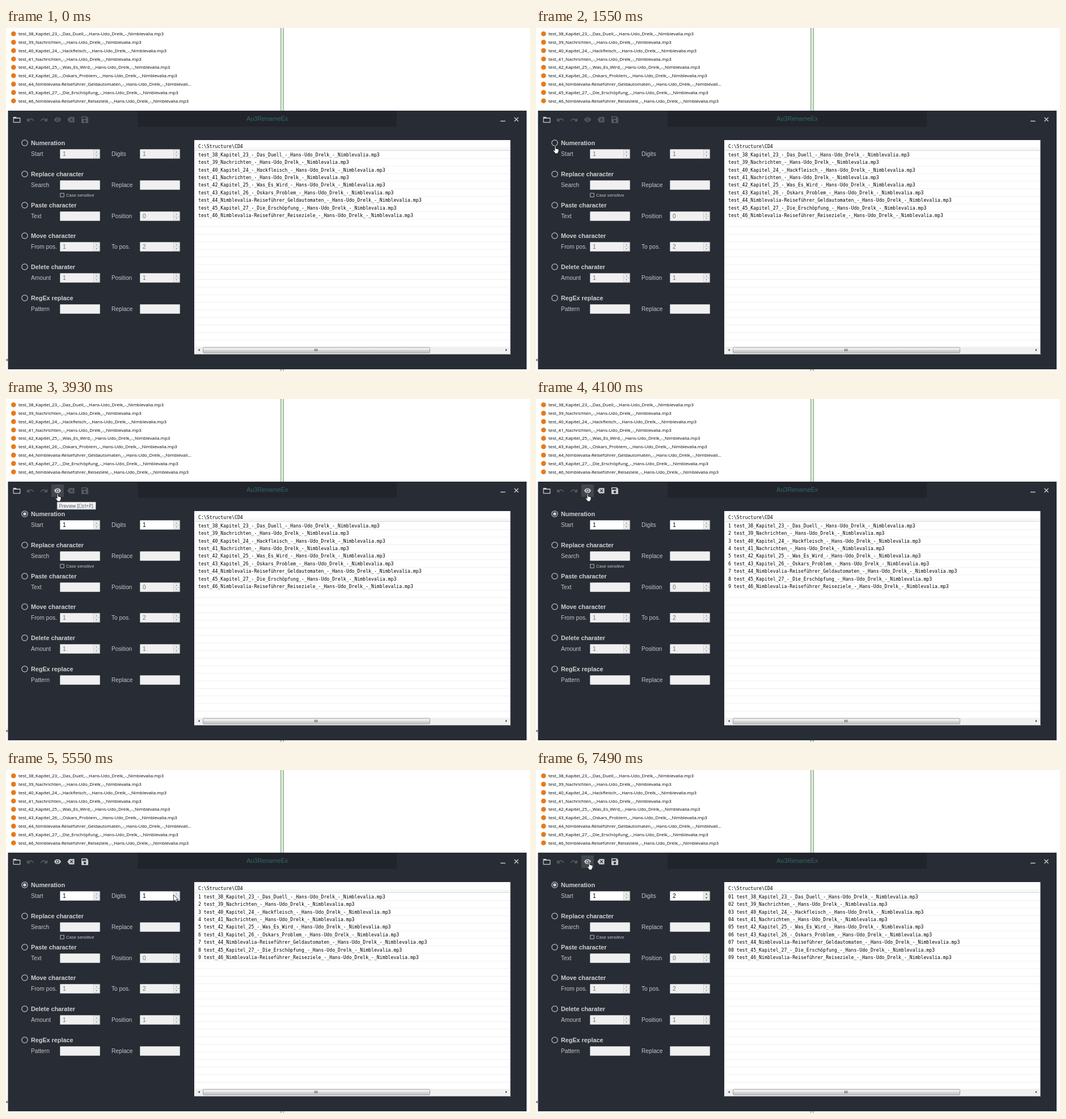
An HTML page for the animation above (8 s loop, 924 by 606 pixels).

```html
<!DOCTYPE html>
<html lang="en">
<head>
<meta charset="utf-8">
<title>Batch rename</title>
<style>
  html, body { margin: 0; width: 100%; height: 100%; overflow: hidden; background: #fff; }
  svg { display: block; width: 100vw; height: 100vh; }
  text { font: 10.2px "Liberation Sans", sans-serif; white-space: pre; }
  .file, .hint { font: 7.95px "Open Sans", sans-serif; fill: #000; }
  .hint { font-size: 8.2px; fill: #555; }
  .mono { font: 8.18px "DejaVu Sans Mono", monospace; fill: #000; }
  .title { font-size: 10.9px; fill: #2f6967; }
  .head { font-weight: bold; font-size: 10.8px; fill: #d0d0d0; }
  .label { fill: #c4c5c7; }
  .small { font-size: 7.6px; fill: #c4c5c7; }
  .field { fill: #f0f0f0; stroke: #b9bbbf; }
  .value { fill: #75756c; }
  .on .field { fill: #fff; }
  .on .value { fill: #000; }
  .on .field.focus { stroke: #6fa8dc; }
  .on .value.focus { fill: #fff; }
  .dot { fill: #d0d0d0; visibility: hidden; }
  .on .dot { visibility: visible; }
  .icon { color: #575b61; }
  .icon.lit { color: #cbcccd; }
</style>
</head>
<body>
<svg id="stage" viewBox="0 0 924 606"></svg>
<script>
const LOOP = 8000;
const AUTHOR = 'Hans-Udo_Drelk', BOOK = 'Nimblevalia';
const files = [
  'Kapitel_23_-_Das_Duell', 'Nachrichten', 'Kapitel_24_-_Hackfleisch', 'Nachrichten',
  'Kapitel_25_-_Was_Es_Wird', 'Kapitel_26_-_Oskars_Problem', BOOK + '-Reiseführer_Geldautomaten',
  'Kapitel_27_-_Die_Erschöpfung', BOOK + '-Reiseführer_Reiseziele'
].map((name, i) => `test_${38 + i}_${name}_-_${AUTHOR}_-_${BOOK}.mp3`);

// Heading, then label and value of both fields; numeric values get a spinner.
const sections = [
  ['Numeration', 'Start', 1, 'Digits', 1],
  ['Replace character', 'Search', '', 'Replace', ''],
  ['Paste character', 'Text', '', 'Position', 0],
  ['Move character', 'From pos.', 1, 'To pos.', 2],
  ['Delete charater', 'Amount', 1, 'Position', 1],
  ['RegEx replace', 'Pattern', '', 'Replace', '']
];

const text = (x, y, cls, str, id = '') => `<text x="${x}" y="${y}" class="${cls}" id="${id}">${str}</text>`;
const rect = (x, y, w, h, attrs) => `<rect x="${x}" y="${y}" width="${w}" height="${h}" ${attrs}/>`;
const path = (d, attrs = 'fill="currentColor"') => `<path d="${d}" ${attrs}/>`;
const repeat = (n, fn) => Array.from({ length: n }, (_, i) => fn(i)).join('');

const icon = (id, x, art, lit = '') =>
  `<g id="${id}" class="icon ${lit}" transform="translate(${x} 162)">${art}</g>`;

const spinner = (x, y, id) => `<g id="${id}" color="#999">` + rect(x, y, 11, 15, 'fill="#f0f0f0"') +
  [.5, 7.5].map(dy => rect(x + .5, y + dy, 10, 7, 'fill="#f1f1f1" stroke="#c6c6c6" stroke-width=".8"')).join('') +
  path(`M${x + 3.6} ${y + 5}h3.8l-1.9-2.2z`) + path(`M${x + 3.6} ${y + 10}h3.8l-1.9 2.2z`) + '</g>';

const field = (x, y, value, id) =>
  rect(x + .5, y + .5, 70, 16, `id="${id}Box" class="field" rx=".6"`) +
  (value === '' ? '' : spinner(x + 59, y + 1, id + 'Spin') +
    rect(x + 5, y + 2, 6, 13, `id="${id}Mark" fill="#3399ff" visibility="hidden"`) +
    text(x + 5, y + 12, 'value', value, id));

function section([title, labelA, valueA, labelB, valueB], i) {
  const y = Math.round(203 + 54.8 * i);
  return `<g id="section${i}">
    <circle cx="33" cy="${y}" r="5.2" fill="none" stroke="#c2c3c5" stroke-width="1.2"/>
    <circle cx="33" cy="${y}" r="2.8" class="dot"/>` +
    text(44, y + 4, 'head', title) +
    text(44, y + 23, 'label', labelA) + text(186, y + 23, 'label', labelB) +
    field(95, y + 11, valueA, 'a' + i) + field(236, y + 11, valueB, 'b' + i) + '</g>';
}

const undoPath = 'M-6-3v6h6l-2.3-2.3c1-.8 2-1.2 3-1.2 2.2 0 3.7 1.2 4.3 3l1.4-.6c-.8-2.5-3-4.2-5.7-4.2-1.6 0-3 .6-4.1 1.6z';
const eyePath = 'M-6 0c1.2-2.8 3.4-4.2 6-4.2s4.8 1.4 6 4.2c-1.2 2.8-3.4 4.2-6 4.2s-4.8-1.4-6-4.2zM0-2.8a2.8 2.8 0 1 0 .01 0z';

const explorer = rect(484, 0, 6, 606, 'fill="#d3efcf"') +
  path('M484.5 0V606M489.5 0V606', 'stroke="#8b958a"') +
  path('M0 604.5H484M490 604.5H924', 'stroke="#eee"') + path('M2.5 584v5l-2.5-2.5z', 'fill="#444"') +
  files.map((name, i) => {
    const y = 10 + 14.8 * i;
    return `<circle cx="13.3" cy="${y + .3}" r="4.3" fill="#e67a1c"/>` +
      text(22, y + 3.1, 'file', i === 6 ? name.slice(0, -5) + '...' : name);
  }).join('');

const toolbar = rect(80, 151, 22, 22, 'id="hover" fill="#42464d"') +
  icon('open', 19, path('M-5.8 4.6v-9h4l1.5 1.6h6.1v7.4z', 'fill="none" stroke="currentColor" stroke-width="1.2"') +
    path('M-5.8-4.6h4l1.5 1.7h6v1h-11.5z'), 'lit') +
  icon('undo', 43, path(undoPath)) +
  icon('redo', 67, `<g transform="scale(-1 1)">${path(undoPath)}</g>`) +
  icon('eye', 91, path(eyePath, 'fill="currentColor" fill-rule="evenodd"') + '<circle r="1.7" fill="currentColor"/>') +
  icon('clear', 114.5, path('M-6.3 0l3.5-4.8h8.8v9.6h-8.8z') + path('M-1.3-2.4l4.6 4.8m0-4.8l-4.6 4.8', 'stroke="#282c34" stroke-width="1.3"')) +
  icon('save', 139, path('M-6-5q0-1 1-1h8.2l2.8 2.8v8.2q0 1-1 1h-10q-1 0-1-1zM-4.5-4.6v3h6.8v-3zM0 .3a2.1 2.1 0 1 0 .01 0z', 'fill="currentColor" fill-rule="evenodd"'));

const list = rect(332, 198, 558, 379, 'fill="#fff"') +
  path('M889.5 198V576.5H332', 'fill="none" stroke="#85878b"') +
  rect(333, 211, 556, 5, 'fill="#f6f7f8"') + path('M333 216.3H889', 'stroke="#d5d5d5"') +
  text(339, 211.7, 'mono', 'C:\\Structure\\CD4') +
  repeat(25, i => path(`M333 ${(230.6 + 13.37 * i).toFixed(1)}H889`, 'stroke="#eee" stroke-width=".9"')) +
  files.map((_, i) => text(339, 227 + 13.37 * i, 'mono', '', 'row' + i)).join('') +
  rect(333, 563.3, 556, 12.7, 'fill="#f0f0f0"') +
  rect(347.5, 564.2, 400, 9.8, 'rx="1.5" fill="url(#thumb)" stroke="#979797" stroke-width=".9"') +
  path('M544.5 566.7v4.4m2.2-4.4v4.4m2.2-4.4v4.4', 'stroke="#555" stroke-width="1"') +
  path('M341.5 566.7v4.4l-2.6-2.2zM881 566.7v4.4l2.6-2.2z', 'fill="#333"');

stage.innerHTML = `<defs>
    <linearGradient id="thumb" x2="0" y2="1"><stop stop-color="#f4f4f4"/><stop offset=".5" stop-color="#e6e6e7"/><stop offset=".52" stop-color="#d4d4d6"/><stop offset="1" stop-color="#c5c5c8"/></linearGradient>
    <linearGradient id="tip" x2="0" y2="1"><stop stop-color="#fff"/><stop offset="1" stop-color="#e4e5f0"/></linearGradient>
  </defs>` + explorer +
  rect(3.5, 146, 914.5, 457, 'fill="#282c34"') + rect(232, 147, 457, 27.5, 'fill="#21242b"') +
  text(424, 164, 'title', 'Au3RenameEx') + toolbar +
  path('M872 164.5h8.5M896.5 158l7 7m0-7l-7 7', 'stroke="#c6c7c9" stroke-width="1.5"') +
  sections.map(section).join('') +
  rect(95.8, 292, 6.4, 6.4, 'fill="none" stroke="#c4c5c7" stroke-width=".9"') + text(106, 298, 'small', 'Case sensitive') +
  rect(247, 216, 1, 12, 'id="caret"') + list +
  `<g id="tooltip">${rect(1.5, 1.5, 69, 13.5, 'fill="#000" opacity=".3"')}
    ${rect(.5, .5, 68.5, 13.2, 'fill="url(#tip)" stroke="#767676" stroke-width=".8"')}${text(4, 10.2, 'hint', 'Preview [Ctrl+P]')}</g>
  <g id="cursor" fill="#fff" stroke="#000" stroke-width=".8" stroke-linejoin="round">
    <path id="arrow" d="M.4.5v11.6l2.7-2.5 1.8 4.1 1.9-.9-1.8-3.9h3.7z"/>
    <path id="hand" d="M-1 .9q0-.9 1-.9t1 .9v4l4.2 1q1.1.4 1 1.6l-.4 3-1.2 2v1.4h-5.3v-1.3l-3.2-4q-.4-1.2.8-1.3l2.1 1.6z"/>
  </g>`;

const el = id => document.getElementById(id);
const show = (id, visible) => el(id).setAttribute('visibility', visible ? 'visible' : 'hidden');
const between = (t, from, to) => t >= from && t < to;

// Pointer moves: first step, last step, number of steps, destination.
const moves = [
  [440, 440, 1, 829, 592], [510, 1220, 10, 79, 242], [1300, 1550, 4, 34, 208],
  [1600, 1600, 1, 33, 206], [1760, 1760, 1, 34, 205], [3010, 3470, 7, 91, 167],
  [4860, 4860, 1, 93, 170], [4940, 5550, 9, 295, 220], [5650, 5650, 1, 299, 221],
  [5720, 5720, 1, 299, 220], [6100, 6730, 9, 94, 163], [6800, 6800, 1, 94, 162.5]
];

function pointer(t) {
  let x = 829, y = 592;
  for (const [start, end, steps, toX, toY] of moves) {
    if (t < start) break;
    const step = steps < 2 ? 1 : Math.min(steps, 1 + Math.round((t - start) / (end - start) * (steps - 1)));
    const p = step / steps, ease = p * p * (3 - 2 * p);
    x += (toX - x) * ease;
    y += (toY - y) * ease;
  }
  return [x, y];
}

function draw(t) {
  const [x, y] = pointer(t);
  const overEye = x >= 80 && x < 102 && y < 173;
  const overRadio = x < 39 && y < 210;
  show('cursor', t >= 440);
  el('cursor').setAttribute('transform', `translate(${x.toFixed(1)} ${y.toFixed(1)})`);
  el('arrow').style.display = overEye || overRadio ? 'none' : '';
  el('hand').style.display = overEye || overRadio ? '' : 'none';
  show('hover', overEye);

  const late = t >= 7000;
  show('tooltip', between(t, 3930, 4000) || between(t, 4550, 4940) || between(t, 7180, 7410));
  el('tooltip').setAttribute('transform', late ? 'translate(93.5 177.5)' : 'translate(89.5 181.5)');

  el('section0').classList.toggle('on', t >= 1990);
  el('eye').classList.toggle('lit', t >= 1990);
  for (const id of ['clear', 'save']) el(id).classList.toggle('lit', t >= 4100);

  const focused = between(t, 5870, 7490);
  el('b0').textContent = t >= 5870 ? 2 : 1;
  for (const id of ['b0', 'b0Box']) el(id).classList.toggle('focus', focused);
  show('b0Mark', focused);
  el('b0Spin').setAttribute('color', t >= 5870 ? '#333' : '#999');
  show('caret', between(t, 5950, 6500) || between(t, 7030, 7490));

  const digits = t >= 7490 ? 2 : t >= 4100 ? 1 : 0;
  files.forEach((name, i) => {
    el('row' + i).textContent = (digits ? String(i + 1).padStart(digits, '0') + ' ' : '') + name;
  });
}

function frame() {
  draw(performance.now() % LOOP);
  requestAnimationFrame(frame);
}
frame();
</script>
</body>
</html>
```
